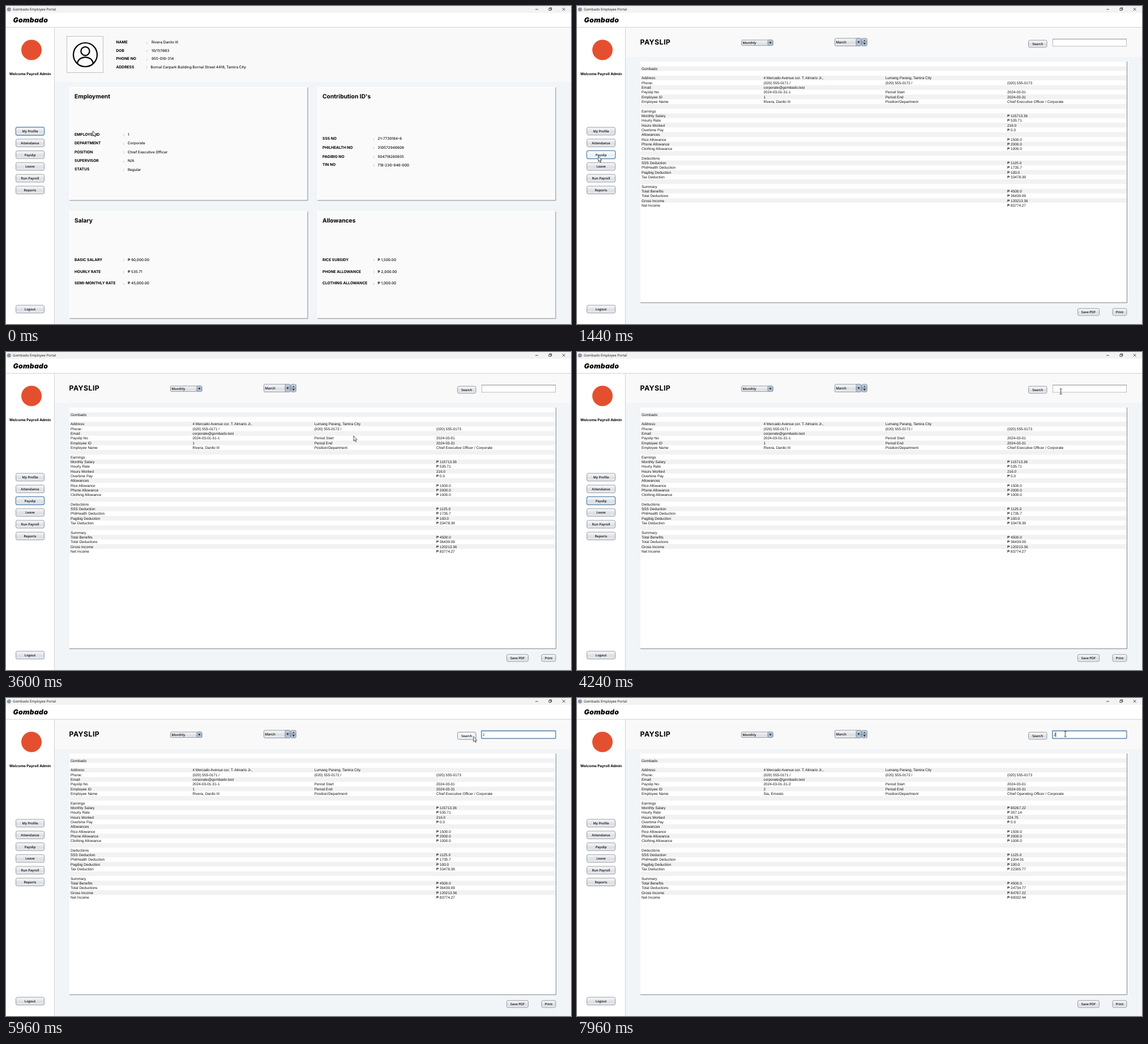
Write an HTML page that moves like this. It is 998 by 561 pixels and loops after 8 s.

```html
<!DOCTYPE html>
<html lang="en">
<head>
<meta charset="utf-8">
<title>Gombado Employee Portal</title>
<style>
html, body { margin: 0; width: 100%; height: 100%; overflow: hidden; background: #fff; }
svg { display: block; width: 100%; height: 100%; }
text { font: 500 6.4px Inter, sans-serif; fill: #111; text-rendering: geometricPrecision; white-space: pre; }
.lab { font-weight: 700; font-size: 6.7px; fill: #000; }
.head { font-weight: 700; font-size: 10.3px; fill: #000; }
.title { font: 400 6.1px "Open Sans", sans-serif; }
.brand { font: italic 900 12.2px Inter, sans-serif; letter-spacing: .3px; fill: #000; }
.welcome { font-weight: 700; font-size: 6.4px; text-anchor: middle; fill: #000; }
.page-title { font-weight: 700; font-size: 12.4px; letter-spacing: .4px; fill: #000; }
.btn { font: 600 5.8px "Open Sans", sans-serif; text-anchor: middle; }
.combo { font: 600 6px "Open Sans", sans-serif; }
.cell { font: 400 6.45px "Liberation Sans", Arial, sans-serif; }
.ring { fill: none; stroke: #6a93b9; stroke-width: 1.3; }

#cursor { animation: move 8s linear infinite; }
@keyframes move {
  0%, .5% { transform: translate(153px, 220px); animation-timing-function: cubic-bezier(.35, .1, .4, 1); }
  6%, 24.5% { transform: translate(37px, 265px); animation-timing-function: cubic-bezier(.4, .1, .5, 1); }
  30.5% { transform: translate(544px, 140px); animation-timing-function: ease-in; }
  34.5% { transform: translate(390px, 172px); }
  35.5% { transform: translate(320px, 187px); animation-timing-function: ease-out; }
  37.5% { transform: translate(251px, 198px); animation-timing-function: ease-in; }
  40% { transform: translate(390px, 156px); }
  42% { transform: translate(520px, 133px); animation-timing-function: ease-out; }
  45%, 45.5% { transform: translate(613.5px, 147.5px); animation-timing-function: cubic-bezier(.4, .1, .4, 1); }
  54.5%, 71.5% { transform: translate(861px, 67.5px); animation-timing-function: ease-in-out; }
  75.5%, 90% { transform: translate(820px, 67.5px); animation-timing-function: ease-in-out; }
  97%, 100% { transform: translate(862.5px, 63.5px); }
}
/* Rings open on press and shrink to a dot on release */
#ripple { animation: ripple 8s linear infinite; }
@keyframes ripple {
  0%, 9.9% { opacity: 0; transform: scale(.2); }
  10% { opacity: 1; transform: scale(.5); }
  11% { opacity: 1; transform: scale(1); }
  12% { opacity: 1; transform: scale(.22); }
  14%, 59.9% { opacity: 0; transform: scale(.1); }
  60% { opacity: 1; transform: scale(.5); }
  61%, 66% { opacity: 1; transform: scale(1); }
  67%, 84.4% { opacity: 0; transform: scale(.1); }
  84.5% { opacity: 1; transform: scale(.5); }
  85.5% { opacity: 1; transform: scale(1); }
  86.5%, 87.4% { opacity: 1; transform: scale(.22); }
  88%, 100% { opacity: 0; transform: scale(.1); }
}
</style>
</head>
<body>
<script>
const LOOP = 8000;

// When each switched part is visible: from, to, from, to ... in ms
const shown = {
  profile: [0, 1040],
  payslip: [1040, LOOP],
  slip1: [0, 6880],
  slip2: [6880, LOOP],
  profileFocus: [0, 800],
  payslipFocus: [800, 4800],
  searchFocus: [6760, 7920],
  fieldFocus: [4800, 6760, 7920, LOOP],
  payslipHover: [440, 2000],
  searchHover: [5920, 7360],
  typed: [5320, LOOP],
  caret: [5320, 5820, 6320, 6760, 7920, LOOP],
  arrow: [0, 4200, 5880, 7480],
  ibeam: [4200, 5880, 7480, LOOP]
};

const css = Object.entries(shown).map(([id, times]) => {
  const keys = times.map((ms, i) => `${ms / LOOP * 100}%{opacity:${1 - i % 2}}`).join('');
  return `#${id}{animation:${id} ${LOOP}ms step-end infinite}@keyframes ${id}{0%{opacity:0}${keys}}`;
}).join('\n');

const text = (x, y, s, cls = '') => `<text x="${x}" y="${y}" class="${cls}">${s}</text>`;
const rect = (x, y, w, h, fill, more = '') =>
  `<rect x="${x}" y="${y}" width="${w}" height="${h}" fill="${fill}" ${more}/>`;
const line = (d, color, w = 1) => `<path d="${d}" fill="none" stroke="${color}" stroke-width="${w}"/>`;
const group = (id, body) => `<g id="${id}">${body}</g>`;
const ring = (id, x, y, w, h, r) =>
  group(id, `<rect class="ring" x="${x}" y="${y}" width="${w}" height="${h}" rx="${r}"/>`);

function button(x, y, w, h, label, name) {
  const box = fill => rect(x, y, w, h, `url(#${fill})`, 'rx="2.5" stroke="#8d929a" stroke-width=".9"');
  let out = box('face');
  if (shown[name + 'Hover']) out += group(name + 'Hover', box('lit'));
  if (shown[name + 'Focus']) out += ring(name + 'Focus', x - .3, y - .3, w + .6, h + .6, 3);
  return out + text(x + w / 2, y + h / 2 + 2.2, label, 'btn');
}

function card(x, y, w, h) {
  return rect(x, y, w, h, '#fafafa') +
    line(`M${x} ${y + h}V${y}H${x + w}`, '#fff') +
    line(`M${x} ${y + h}H${x + w}V${y}`, '#85878a');
}

// Label, colon and value rows
const fields = (x, colon, value, rows) => rows.map(([y, label, s, dx = 0, dy = 0]) =>
  text(x, y + 2.3, label, 'lab') + text(colon, y + 2.5 + dy, ':') + text(value + dx, y + 2.3 + dy, s)).join('');

const defs = `<defs>${[
  ['face', '#fafbfc', '#dadde2', '#eceef1'],
  ['lit', '#ffffff', '#eaeff5', '#f8fafc'],
  ['blue', '#c9d6e5', '#9fb4cb', '#c3d2e3']
].map(([id, a, b, c]) => `<linearGradient id="${id}" x2="0" y2="1"><stop stop-color="${a}"/>
  <stop offset=".6" stop-color="${b}"/><stop offset="1" stop-color="${c}"/></linearGradient>`).join('')}</defs>`;

const profile = rect(86, 38, 912, 523, '#f1f5f8') + rect(86, 38, 912, 96, '#f9f9fa') +
  rect(107.5, 53.5, 64, 64, '#fafafa', 'stroke="#bfc1c2"') +
  `<g fill="none" stroke="#000" stroke-width="2.2"><circle cx="140" cy="86" r="21"/>
   <circle cx="140" cy="79.7" r="7.6"/><path d="M126 101.6C128 86.6 152 86.6 154 101.6"/></g>` +
  fields(194.5, 248, 257, [
    [64, 'NAME', 'Rivera Danilo III'],
    [78.5, 'DOB', '10/11/1983'],
    [93, 'PHONE NO', '955-010-314'],
    [107.7, 'ADDRESS', 'Bornal Carpark Building Bornal Street 4418, Tamira City', -1.5, -.3]
  ]) +
  card(112.5, 143.5, 420.5, 199.5) + card(550.5, 143.5, 420.5, 199.5) +
  card(112.5, 362.5, 420.5, 188.8) + card(550.5, 362.5, 420.5, 188.8) +
  text(121, 163, 'Employment', 'head') + text(559, 163, "Contribution ID's", 'head') +
  text(121, 381.5, 'Salary', 'head') + text(559, 381.5, 'Allowances', 'head') +
  fields(121, 207, 215, [
    [226.4, 'EMPLOYEE ID', '1'],
    [242, 'DEPARTMENT', 'Corporate'],
    [257.5, 'POSITION', 'Chief Executive Officer'],
    [273, 'SUPERVISOR', 'N/A'],
    [288, 'STATUS', 'Regular', 0, .8],
    [447.5, 'BASIC SALARY', '₱ 90,000.00'],
    [468.2, 'HOURLY RATE', '₱ 535.71'],
    [488.3, 'SEMI-MONTHLY RATE', '₱ 45,000.00', 0, .8]
  ]) +
  fields(559, 648.5, 656.5, [
    [234, 'SSS NO', '21-7730184-6'],
    [249.7, 'PHILHEALTH NO', '310572946608'],
    [265.3, 'PAGIBIG NO', '504718260935'],
    [280, 'TIN NO', '718-230-946-000', 0, .9],
    [447.5, 'RICE SUBSIDY', '₱ 1,500.00'],
    [468.2, 'PHONE ALLOWANCE', '₱ 2,000.00'],
    [488.3, 'CLOTHING ALLOWANCE', '₱ 1,000.00', 0, .8]
  ]);

// Payslip table
const cols = [114, 329.5, 544.7, 760];
const cell = (row, col, s) => text(cols[col], (104.5 + row * 8.31).toFixed(1), s, 'cell');
const column = (col, start, list) => list.map((s, i) => s ? cell(start + i, col, s) : '').join('');

const table = Array.from({ length: 15 }, (_, i) =>
  rect(112.5, (106.3 + i * 16.62).toFixed(2), 858.5, 8.31, '#f2f2f2')).join('') +
  column(0, 1, ['Gombado', '', 'Address:', 'Phone:', 'Email:', 'Payslip No', 'Employee ID', 'Employee Name', '',
    'Earnings', 'Monthly Salary', 'Hourly Rate', 'Hours Worked', 'Overtime Pay', 'Allowances', 'Rice Allowance',
    'Phone Allowance', 'Clothing Allowance', '', 'Deductions', 'SSS Deduction', 'PhilHealth Deduction',
    'Pagibig Deduction', 'Tax Deduction', '', 'Summary', 'Total Benefits', 'Total Deductions',
    'Gross Income', 'Net Income']) +
  column(1, 3, ['4 Mercado Avenue cor. T. Almario Jr.,', '(020) 555-0171 /', 'corporate@gombado.test']) +
  column(2, 3, ['Lumang Parang, Tamira City', '(020) 555-0172 /', '', 'Period Start', 'Period End', 'Position/Department']) +
  column(3, 4, ['(020) 555-0173', '', '2024-03-01', '2024-03-31']) +
  column(3, 14, ['₱ 0.0', '', '₱ 1500.0', '₱ 2000.0', '₱ 1000.0']) +
  cell(21, 3, '₱ 1125.0') + cell(23, 3, '₱ 100.0') + cell(27, 3, '₱ 4500.0');

function slip(no, name, job, salary, rate, hours, health, tax, cut, gross, net) {
  return group('slip' + no, column(1, 6, ['2024-03-01-31-' + no, no, name]) +
    cell(8, 3, job + ' / Corporate') + column(3, 11, ['₱ ' + salary, '₱ ' + rate, hours]) +
    cell(22, 3, '₱ ' + health) + cell(24, 3, '₱ ' + tax) +
    column(3, 28, ['₱ ' + cut, '₱ ' + gross, '₱ ' + net]));
}

const down = (x, y) => `<path d="M${x - 2} ${y - 1.5}h4l-2 3.2z" fill="#222"/>`;
const up = (x, y) => `<path d="M${x - 1.5} ${y + 1}h3l-1.5 -2.2z" fill="#222"/>`;
function combo(x, y, w, h, label) {
  const edge = 'rx="1.8" stroke="#848b95" stroke-width=".9"';
  return rect(x, y, w, h, 'url(#face)', edge) + rect(x + w - 9, y, 9, h, 'url(#blue)', edge) +
    down(x + w - 4.5, y + h / 2) + text(x + 2, y + h / 2 + 2.2, label, 'combo');
}

const payslip = rect(86, 38, 912, 523, '#f1f5f8') + rect(86, 38, 912, 52, '#f9f9fa') +
  text(111.5, 68.2, 'PAYSLIP', 'page-title') +
  combo(290.5, 60, 55.5, 9.6, 'Monthly') + combo(455.5, 57, 46.5, 13.5, 'March') +
  rect(503.3, 57, 9, 13.5, 'url(#blue)', 'rx="1.8" stroke="#848b95" stroke-width=".9"') +
  line('M503.3 63.7h9', '#848b95', .8) + up(507.8, 60.8) + down(507.8, 66.8) +
  button(797.5, 60.3, 32.5, 12.6, 'Search', 'search') +
  rect(840.5, 58.5, 130, 12.5, '#fff', 'stroke="#b2b4b7" stroke-width=".9"') +
  line('M840 58.3h131', '#8b8d91', .8) +
  ring('fieldFocus', 839.7, 57.7, 131.3, 13.8, .8) +
  group('typed', text(842, 67, '2', 'title')) +
  group('caret', line('M845.7 60.2v8.6', '#000', .8)) +
  rect(112, 98, 859.5, 425.5, '#fff') + table +
  slip('1', 'Rivera, Danilo III', 'Chief Executive Officer', '115713.36', '535.71', '216.0',
    '1735.7', '33478.39', '36439.09', '120213.36', '83774.27') +
  slip('2', 'Sia, Ernesto', 'Chief Operating Officer', '80267.22', '357.14', '224.75',
    '1204.01', '22305.77', '24734.77', '84767.22', '60032.44') +
  line('M112 523.5H971.5V98', '#85878a') +
  button(884.5, 533.6, 38, 12.4, 'Save PDF') + button(946, 533.6, 25, 12.4, 'Print');

const menu = [['My Profile', 'profile'], ['Attendance'], ['Payslip', 'payslip'], ['Leave'], ['Run Payroll'], ['Reports']]
  .map(([label, name], i) => button(17.5, 214 + i * 20.75, 50, 13.7, label, name)).join('');

const frame = rect(0, 0, 998, 12, '#f3f3f3') + '<circle cx="5.3" cy="6" r="3.6" fill="#8c9bab"/>' +
  text(12, 8.3, 'Gombado Employee Portal', 'title') +
  line('M935 6h5M959 4.2h3.6v3.6h-3.6zM960.2 4.2v-1.2h3.6v3.6h-1.2M982.6 3.2l5 5m0 -5l-5 5', '#222', .8) +
  rect(0, 12, 998, 25.5, '#fff') + rect(0, 38, 85, 523, '#fff') +
  line('M0 37.6H998', '#cfd1d3') + line('M85.4 38V561', '#cfd1d3') +
  text(12.5, 29, 'Gombado', 'brand') +
  '<circle cx="45" cy="77.5" r="18" fill="#e4502f"/>' +
  text(42.5, 121.8, 'Welcome Payroll Admin', 'welcome') +
  menu + button(17.5, 527.9, 50, 13.7, 'Logout');

const cursor = group('ripple', `<g fill="none"><circle r="11" stroke="#8edbe0" stroke-width="1.8"/>
  <circle r="6.8" stroke="#3fbcc6" stroke-width="1.9"/></g>`) +
  group('arrow', `<path d="M.4 .4V9.4L2.5 7.6L4 10.8L5.4 10.2L4 7.1H6.6Z"
    fill="#fff" stroke="#111" stroke-width=".75" stroke-linejoin="round"/>`) +
  group('ibeam', line('M-1.9 -4.6H-.6L0 -4.1L.6 -4.6H1.9M0 -4.1V4.1M-1.9 4.6H-.6L0 4.1L.6 4.6H1.9', '#111', .9));

document.body.innerHTML = `<style>${css}</style><svg viewBox="0 0 998 561">${defs}` +
  group('profile', profile) + group('payslip', payslip) +
  frame + group('cursor', cursor) + '</svg>';
</script>
</body>
</html>
```
